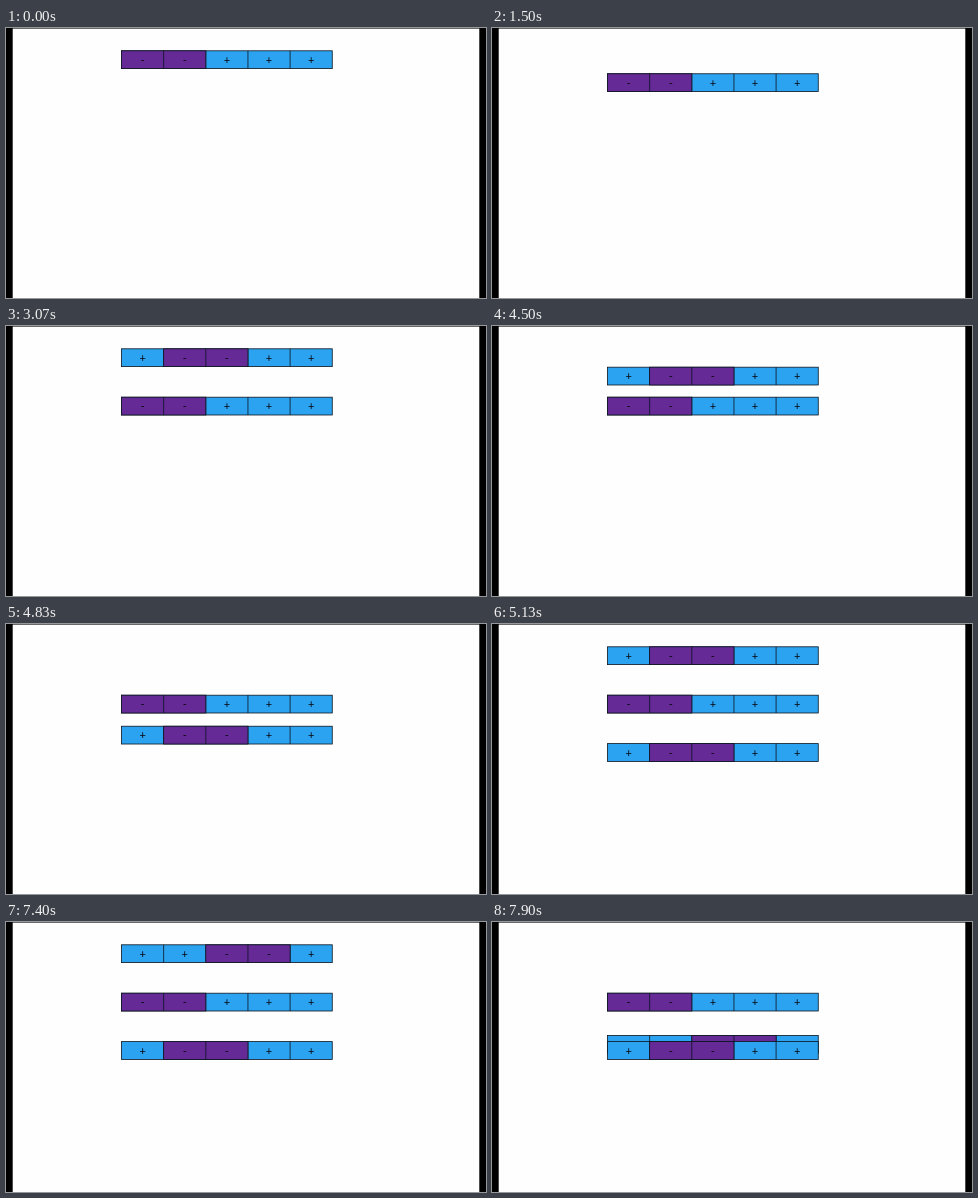
Recreate the animation shown at these times as an HTML page. Size 480 by 270 pixels, loop 8 s.

```html
<!DOCTYPE html>
<html lang="en">
<head>
<meta charset="utf-8">
<title>Sliding signs</title>
<style>
  html, body { margin: 0; width: 100%; height: 100%; overflow: hidden; background: #fefefe; }
  svg { display: block; width: 480px; height: 270px; }
  .line { stroke: #0c1420; stroke-width: 0.8; }
  text { font: 11px Lato, "Open Sans", sans-serif; text-anchor: middle; fill: #0a0a14; }
</style>
</head>
<body>
<svg viewBox="0 0 480 270">
  <rect width="480" height="270" fill="#fefefe"/>
  <rect width="480" height="0.8" fill="#444"/>
  <g id="rows"></g>
  <rect width="6.7" height="270"/>
  <rect x="473.3" width="6.7" height="270"/>
</svg>
<script>
const LOOP = 8000, FPS = 12;
const LEFT = 115.5, TOP = 22.8, CELL = 42.15, HEIGHT = 17.8, GAP = 48.4;
const BLUE = '#2ca3f0', PURPLE = '#652a96';

// Moments when each row starts to drop, and how long moves take
const DROPS = [1086, 4238, 7435];
const MOVE = 850, SLIDE_DELAY = 140;

function add(parent, tag, attrs = {}) {
  const el = document.createElementNS('http://www.w3.org/2000/svg', tag);
  for (const key in attrs) el.setAttribute(key, attrs[key]);
  return parent.appendChild(el);
}

function addCells(parent, count, fill, sign) {
  add(parent, 'rect', { class: 'line', width: count * CELL, height: HEIGHT, fill });
  for (let i = 0; i < count; i++) {
    if (i) add(parent, 'path', { class: 'line', d: `M${i * CELL} 0v${HEIGHT}` });
    add(parent, 'text', { x: (i + 0.5) * CELL, y: 13.2 }).textContent = sign;
  }
}

function makeRow(index) {
  const group = add(document.getElementById('rows'), 'g');
  addCells(group, 5, BLUE, '+');
  const pair = add(group, 'g');
  addCells(pair, 2, PURPLE, '-');
  return { index, group, pair };
}

// Newer rows lie behind the older ones
const rows = [2, 1, 0].map(makeRow);

function ease(start, t) {
  const u = Math.min(1, Math.max(0, (t - start) / MOVE));
  return u < 0.5 ? 2 * u * u : 1 - 2 * (1 - u) * (1 - u);
}

// The picture advances in steps, each shown slightly early
function snap(t) {
  return Math.floor((t + 40) * FPS / 1000) * 1000 / FPS;
}

function draw(t) {
  for (const { index, group, pair } of rows) {
    const born = index ? DROPS[index - 1] + MOVE : 0;
    const slide = index ? ease(born + SLIDE_DELAY, t) : 0;
    const shift = Math.max(0, index - 1) + slide;
    const y = TOP + ease(DROPS[index], t) * GAP * (index + 1);
    group.setAttribute('visibility', t >= born ? 'visible' : 'hidden');
    group.setAttribute('transform', `translate(${LEFT} ${y})`);
    pair.setAttribute('transform', `translate(${shift * CELL} 0)`);
  }
}

const begin = performance.now();
function loop() {
  draw(snap((performance.now() - begin) % LOOP));
  requestAnimationFrame(loop);
}
loop();
</script>
</body>
</html>
```
